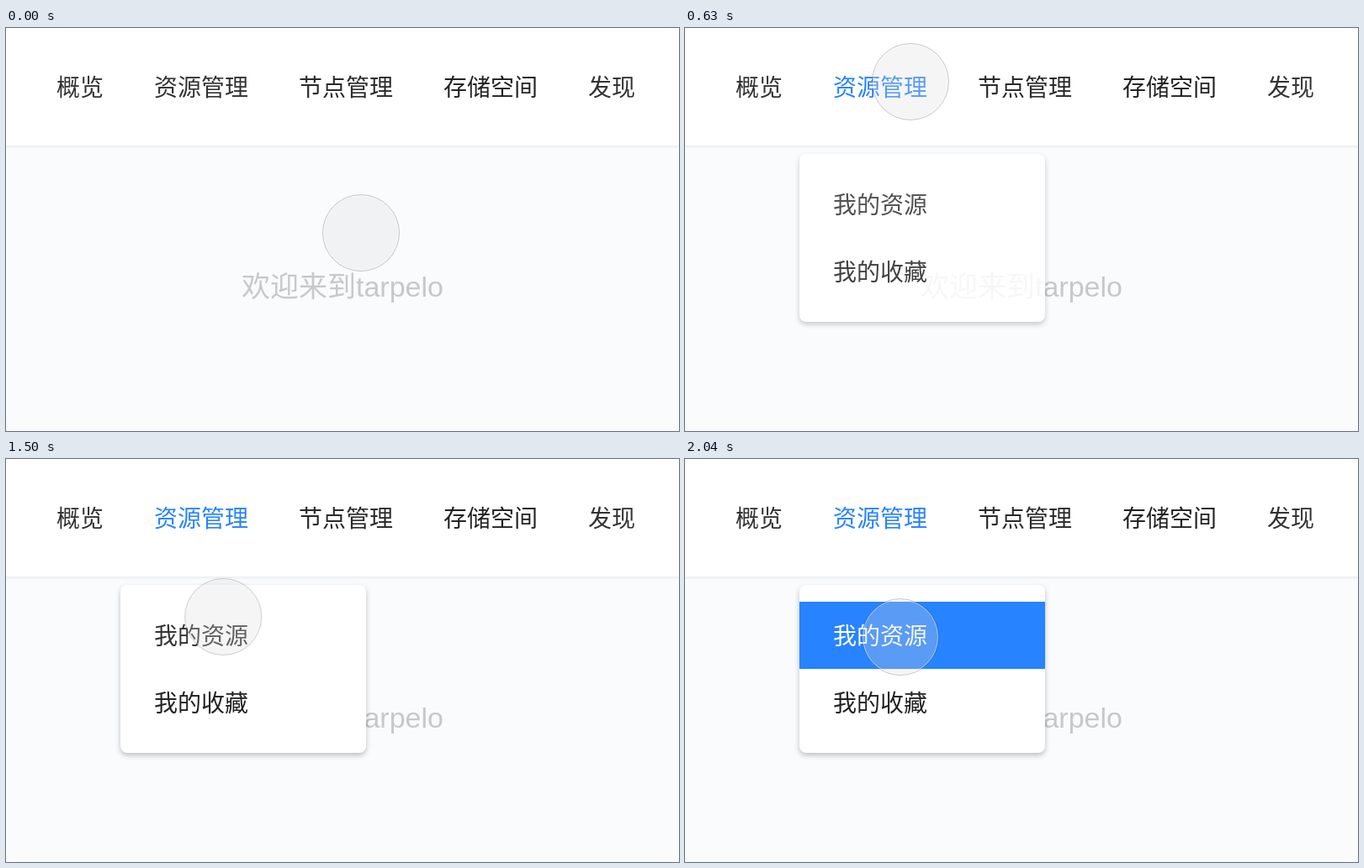
Write an HTML page that moves like this. It is 800 px wide and 480 px high and loops after 2310 ms.

```html
<!DOCTYPE html>
<html lang="zh-CN">
<head>
<meta charset="utf-8">
<title>导航菜单</title>
<style>
  html, body { margin: 0; width: 100%; height: 100%; overflow: hidden; background: #fafbfd; }
  svg { display: block; width: 800px; height: 480px; }
  text { font: 28px "Liberation Sans", "Noto Sans CJK SC", "Noto Sans CJK", sans-serif; fill: #2a2a2a; }
  .soft { fill: #333; }
  .dark { fill: #222; }
  .welcome { font-size: 34px; fill: #c8c8c8; }
  .panel { fill: #fff; filter: drop-shadow(0 3px 3px rgba(0, 0, 0, .24)); }
  .band { fill: #2783ff; }

  .tab, .menu, .band, .item, .pointer { animation: 2310ms linear infinite; }
  .tab { animation-name: tab; animation-timing-function: step-end; }
  .item { animation-name: item; animation-timing-function: step-end; }
  .menu { animation-name: menu; }
  .band { animation-name: band; }
  .pointer { animation-name: pointer; }

  @keyframes tab {
    0% { fill: #333; }
    14.94%, 100% { fill: #2783ff; }
  }
  @keyframes item {
    0% { fill: #333; font-weight: 400; }
    69.48%, 100% { fill: #fff; font-weight: 500; }
  }
  @keyframes menu {
    0% { opacity: 0; }
    15.58% { opacity: 0; animation-timing-function: cubic-bezier(.33, .67, .67, 1); }
    34.63%, 100% { opacity: 1; }
  }
  @keyframes band {
    0% { opacity: 0; }
    68.83% { opacity: 0; animation-timing-function: cubic-bezier(.33, .67, .67, 1); }
    88.31%, 100% { opacity: 1; }
  }
  @keyframes pointer {
    0% { transform: translate(422px, 244px); }
    .65% { transform: translate(422px, 244px); animation-timing-function: cubic-bezier(.35, .05, .6, .9); }
    16.88% { transform: translate(252px, 84px); animation-timing-function: cubic-bezier(.3, .5, .6, 1); }
    23.38%, 45.67% { transform: translate(268px, 64px); }
    46.32% { transform: translate(268px, 66px); animation-timing-function: cubic-bezier(.3, .1, .6, .85); }
    55.41% { transform: translate(264px, 152px); animation-timing-function: cubic-bezier(.3, .5, .7, .85); }
    68.83% { transform: translate(257px, 196px); }
    71.43% { transform: translate(256px, 202px); }
    75.32% { transform: translate(256px, 210px); animation-timing-function: ease-out; }
    88.31%, 100% { transform: translate(256px, 212px); }
  }
</style>
</head>
<body>
<svg viewBox="0 0 800 480">
  <defs>
    <linearGradient id="edge" x2="0" y2="1">
      <stop stop-opacity=".06"/>
      <stop offset="1" stop-opacity="0"/>
    </linearGradient>
  </defs>
  <rect width="800" height="480" fill="#fafbfd"/>
  <text class="welcome" x="280" y="320">欢迎来到tarpelo</text>

  <rect width="800" height="140" fill="#fff"/>
  <rect y="140" width="800" height="4" fill="url(#edge)"/>
  <text class="soft" x="60" y="81">概览</text>
  <text class="tab" x="176" y="81">资源管理</text>
  <text x="348" y="81">节点管理</text>
  <text class="dark" x="520" y="81">存储空间</text>
  <text class="soft" x="692" y="81">发现</text>

  <g class="menu">
    <rect class="panel" x="136" y="150" width="292" height="200" rx="8"/>
    <rect class="band" x="136" y="170" width="292" height="80"/>
    <text class="item" x="176" y="221">我的资源</text>
    <text class="dark" x="176" y="301">我的收藏</text>
  </g>

  <g class="pointer">
    <circle r="45.5" fill="#dbdbdb" fill-opacity=".28"/>
    <circle r="44.5" fill="none" stroke="#fff" stroke-opacity=".45"/>
    <circle r="45.5" fill="none" stroke="#000" stroke-opacity=".2"/>
  </g>
</svg>
</body>
</html>
```
